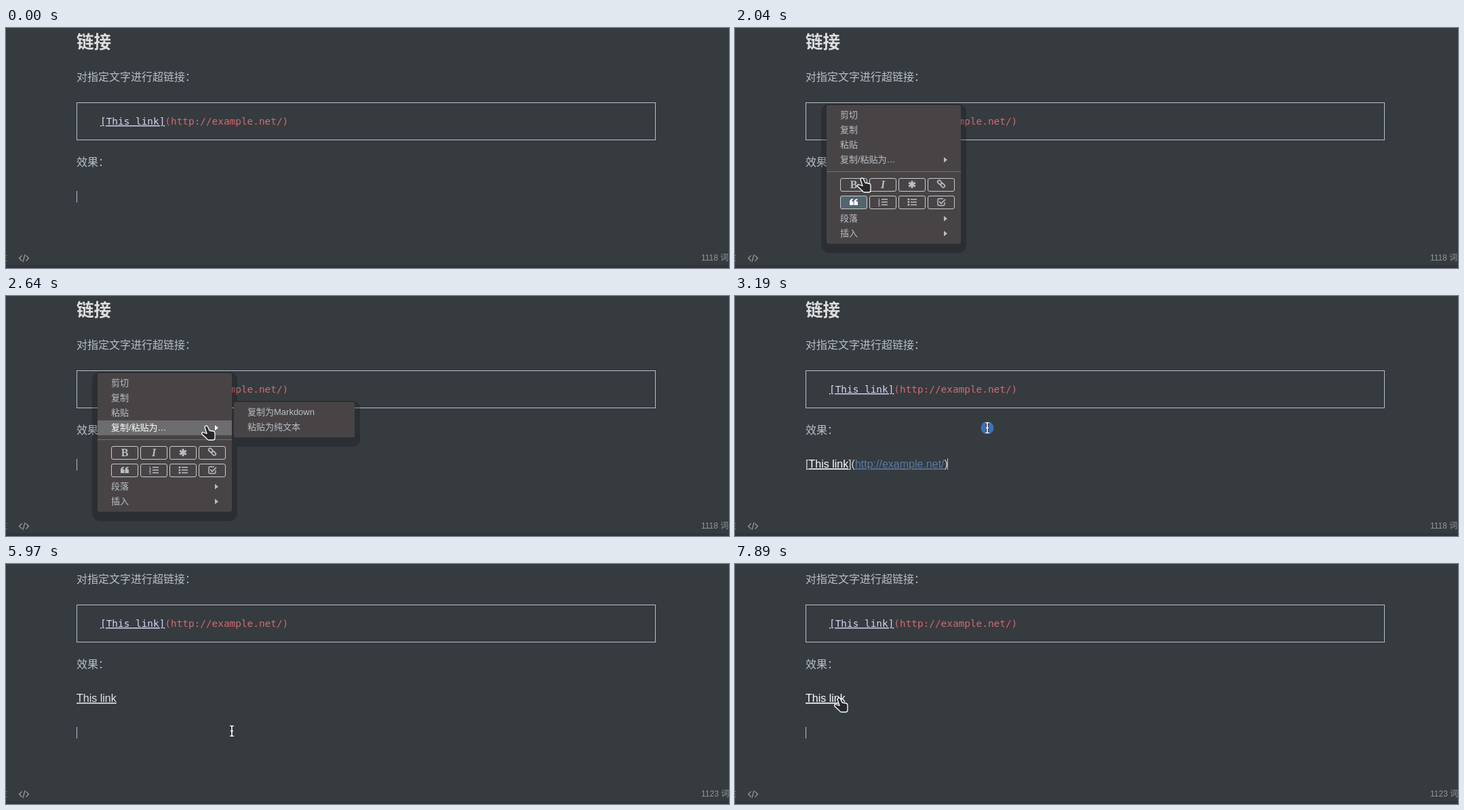
Animation, 1066 px wide and 355 px high, one loop 8 s. Source, as an HTML page:

```html
<!DOCTYPE html>
<html lang="zh-CN">
<head>
<meta charset="utf-8">
<title>Markdown 链接</title>
<style>
  html, body { margin: 0; width: 100%; height: 100%; overflow: hidden; background: #363b40; }
  svg { display: block; width: 1066px; height: 355px; }
  text { font: 16px "Liberation Sans", "Noto Sans CJK SC", "Noto Sans CJK", sans-serif; fill: #b8bfc6; white-space: pre; }
  .title { font-size: 25.6px; font-weight: bold; fill: #dedede; }
  .code { font: 14.4px "DejaVu Sans Mono", monospace; fill: #d26b6b; }
  .code tspan { fill: #d8d5f4; }
  .u { text-decoration: underline; }
  .link { fill: #e6e6e6; }
  .url { fill: #5b7ba3; }
  .foot { font-size: 12px; fill: #92979c; }
  .menu text { font-size: 13px; }
  .menu .serif { font: bold 16px "Liberation Serif", serif; text-anchor: middle; }
  .menu .italic { font-style: italic; }
  .menu .digit { font-size: 5px; font-weight: bold; }
  .panel { fill: #484446; }
  .arrow, .solid { fill: #b8bfc6; }
  .line { fill: none; stroke: #b8bfc6; stroke-width: 1.7; }
  .button { fill: none; stroke: #c6cacd; }
  .row > rect { fill: none; }
  .row.hover > rect { fill: #6d6c6e; }
  .row.hover text, .row.hover .arrow { fill: #fff; }
  .quote.hover .button { fill: #54646f; }
  .quote.hover .solid { fill: #fff; }
</style>
</head>
<body>
<svg viewBox="0 0 1066 355">
  <rect width="1066" height="355" fill="#363b40"/>
  <g id="page">
    <text class="title" x="104" y="30">链接</text>
    <text x="104" y="78">对指定文字进行超链接：</text>
    <rect x="104.5" y="110.5" width="853" height="55" fill="none" stroke="#b8bfc6"/>
    <text class="code" x="139" y="143"><tspan class="u">[This link]</tspan>(http://example.net/)</text>
    <text x="104" y="204">效果：</text>
    <text id="raw" x="104" y="254" style="fill:#d3d7da">[<tspan class="u" fill="#fff">This link</tspan>](<tspan class="url u">http://example.net/</tspan>)</text>
    <text id="link" class="link u" x="104" y="254">This link</text>
  </g>
  <rect id="caret" width="1" height="17" fill="#b8bfc6"/>

  <rect y="351" width="1066" height="4" fill="#323439"/>
  <path d="M0 336.5h1.2M0 344.5h1.2M0 340h.7" stroke="#92979c"/>
  <path d="M23.5 336.5l-4 4 4 4M29.5 336.5l4 4-4 4M28 335l-3 11" fill="none" stroke="#a0a5a9" stroke-width="1.1"/>
  <text class="foot" id="count" x="1025" y="344"></text>

  <g id="shadows" opacity=".2">
    <rect x="127" y="112" width="214" height="221" rx="12"/>
    <rect id="subShadow" x="328" y="155" width="194" height="68" rx="11"/>
  </g>
  <g id="submenu" class="menu">
    <rect class="panel" x="336" y="157" width="178" height="52" rx="2"/>
    <g class="row"><text x="356" y="176">复制为Markdown</text></g>
    <g class="row" id="pastePlain"><rect x="336" y="183" width="178" height="22"/><text x="356" y="198">粘贴为纯文本</text></g>
  </g>
  <g id="menu" class="menu">
    <rect class="panel" x="135" y="114" width="198" height="205" rx="3"/>
    <g id="rows"></g>
    <path d="M135 212.5h198" stroke="#706f71"/>
    <g id="buttons"></g>
  </g>

  <circle id="ripple" fill="#3d70b5"/>
  <g id="beam" fill="none">
    <path d="M-3-7.5h6M-3 7.5h6M0-7.5v15M-2 0h4" stroke="#202326" stroke-width="3.4"/>
    <path d="M-3-7.5h6M-3 7.5h6M0-7.5v15M-2 0h4" stroke="#fff" stroke-width="1.7"/>
  </g>
  <path id="hand" d="M-1 2Q0-1 3 .5L6 7L12 8Q14 8.500 14 11V18Q14 21 11 21H5Q3 21 2 19L-5 12.500Q-6 10-4 9.500L2 11.500Z"
        fill="#27282b" stroke="#fff" stroke-width="1.3" stroke-linejoin="round"/>
</svg>
<script>
const $ = id => document.getElementById(id);
const LOOP = 8000;

const rows = [["剪切", 128], ["复制", 150], ["粘贴", 172], ["复制/粘贴为…", 194, true], ["段落", 281, true], ["插入", 303, true]];
$("rows").innerHTML = rows.map(([label, y, nested]) => `<g class="row">
  <rect x="135" y="${y - 10}" width="198" height="22"/>
  <text x="155" y="${y + 5}">${label}</text>
  ${nested ? `<path class="arrow" d="M308 ${y - 3}l5 4-5 4z"/>` : ""}</g>`).join("");

// Icons are drawn around the centre of their button.
const listLines = '<path class="line" d="M-2-4h9M-2 0h9M-2 4h9"/>';
const quoteMark = x => `<path class="solid" d="M${x} 0C${x}-3 ${x + 2}-5 ${x + 5}-5v1.6q-2 .4-2 2.4h2.500v5.500h-5.500z"/>`;
const chain = x => `<rect class="line" x="${x}" y="-2.2" width="6.5" height="4.4" rx="2"/>`;
const icons = [
  '<text class="serif" y="5">B</text>',
  '<text class="serif italic" y="5">I</text>',
  '<path class="line" style="stroke-width:2.8" d="M0-5.5v11M-4.8-2.8l9.6 5.6M-4.8 2.8l9.6-5.6"/>',
  `<g transform="translate(0 -1) rotate(45)">${chain(-6.5)}${chain(0)}</g>`,
  quoteMark(-6) + quoteMark(.5),
  [1, 2, 3].map(n => `<text class="digit" x="-7" y="${n * 4 - 6}">${n}</text>`).join("") + listLines,
  [-4, 0, 4].map(y => `<circle class="solid" cx="-5" cy="${y}" r="1.4"/>`).join("") + listLines,
  '<path class="line" style="stroke-width:1.4" d="M5 0v3q0 2-2 2h-6q-2 0-2-2v-6q0-2 2-2h6"/><path class="line" d="M-3-1l3 3 6-6"/>'
];
$("buttons").innerHTML = icons.map((icon, i) => `<g class="${i === 4 ? "quote" : ""}"
  transform="translate(${175 + i % 4 * 43} ${i < 4 ? 232 : 258})">
  <rect class="button" x="-19.5" y="-9.5" width="39" height="19" rx="2.5"/>
  <g transform="translate(0 -.5)">${icon}</g></g>`).join("");

const nestedRow = $("rows").children[3];
const quoteButton = document.querySelector(".quote");

const caretToggles = [170, 670, 890, 1390, 1890, 2390, 2890, 3100, 3610, 4110, 4630,
  5020, 5470, 5970, 6470, 6970, 7390, 7890];

// Pointer path: time, x, y
const path = [[640, 134, 249], [1360, 134, 249], [1700, 168, 252], [2040, 186, 222],
  [2250, 215, 200], [2640, 294, 192], [2960, 372, 195], [3230, 372, 195], [3700, 333, 247],
  [6900, 333, 247], [7200, 215, 205], [7500, 152, 198], [LOOP, 152, 198]];

function pointerAt(t) {
  const i = Math.max(1, path.findIndex(p => p[0] >= t));
  const [t0, x0, y0] = path[i - 1], [t1, x1, y1] = path[i];
  const k = Math.max(0, (t - t0) / (t1 - t0));
  return [x0 + (x1 - x0) * k, y0 + (y1 - y0) * k];
}

const show = (id, on) => { $(id).style.display = on ? "" : "none"; };

function setRipple(t) {
  const click = [[640, 134, 249], [3100, 372, 195]].find(([start]) => t >= start && t < start + 290);
  show("ripple", click);
  if (!click) return;
  const [start, x, y] = click, k = (t - start) / 290;
  const attrs = { cx: x, cy: y, r: 8 + 5 * k, opacity: Math.min(1, 1.5 * (1 - k)) };
  for (const name in attrs) $("ripple").setAttribute(name, attrs[name]);
}

function draw(t) {
  const between = (a, b) => t >= a && t < b;
  const rendered = t >= 5020, pasted = between(3130, 5020);
  const menuOpen = between(1360, 3100), submenuOpen = between(2450, 3100);

  $("page").setAttribute("transform", `translate(0 ${rendered ? -50 : 0})`);
  show("raw", pasted);
  show("link", rendered);
  $("count").textContent = (t < 3650 ? 1118 : 1123) + " 词";

  show("caret", caretToggles.filter(time => time <= t).length % 2 === 0);
  $("caret").setAttribute("x", pasted ? 313 : 104);
  $("caret").setAttribute("y", pasted ? 240 : 241);

  for (const id of ["menu", "shadows"]) show(id, menuOpen);
  for (const id of ["submenu", "subShadow"]) show(id, submenuOpen);
  quoteButton.classList.toggle("hover", between(1700, 2090));
  nestedRow.classList.toggle("hover", between(2250, 3100));
  $("pastePlain").classList.toggle("hover", between(2840, 3100));

  const [x, y] = pointerAt(t);
  const overLink = rendered && x < 163;
  const hand = menuOpen || overLink;
  $("link").style.fill = overLink ? "#fff" : "";
  show("hand", hand);
  show("beam", t >= 640 && !hand);
  for (const id of ["hand", "beam"]) $(id).setAttribute("transform", `translate(${Math.round(x)} ${Math.round(y)})`);
  setRipple(t);
}

function tick() {
  draw(performance.now() % LOOP);
  requestAnimationFrame(tick);
}
tick();
</script>
</body>
</html>
```
